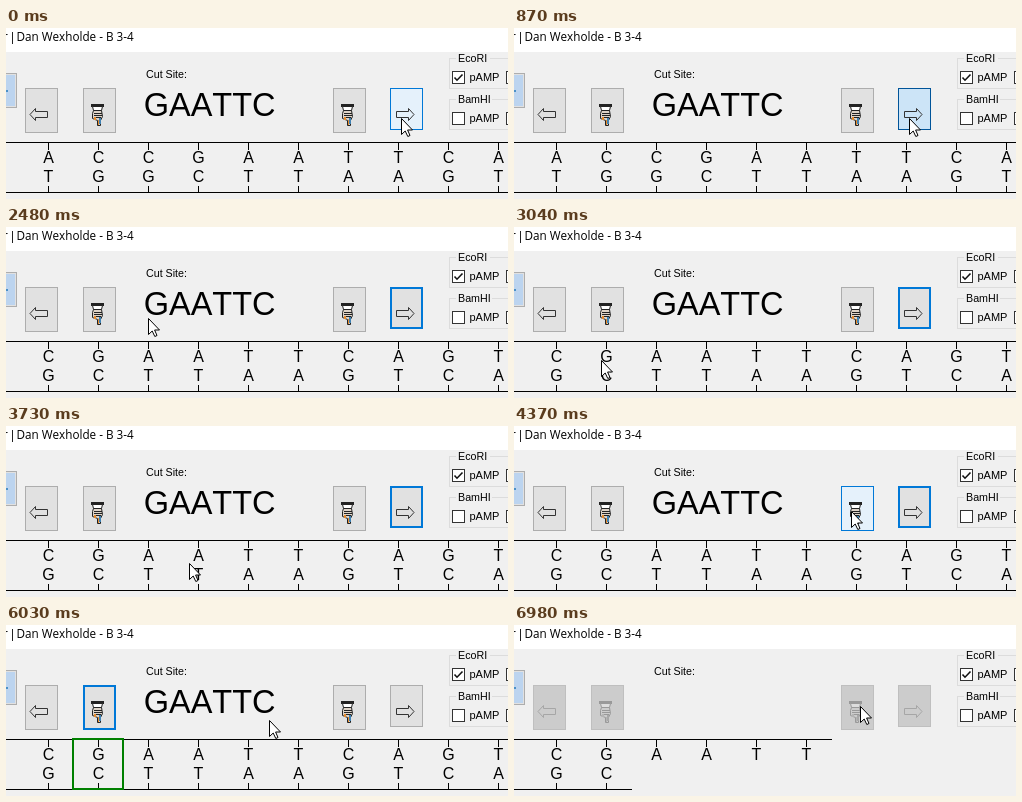
Recreate the animation shown at these times as an HTML page with a canvas. Size 502 by 171 pixels, loop 7710 ms.

```html
<!DOCTYPE html>
<html>
<head>
<meta charset="utf-8">
<style>
  html, body { margin: 0; width: 100%; height: 100%; overflow: hidden; background: #f0f0f0; }
  canvas { display: block; }
</style>
</head>
<body>
<canvas id="stage" width="502" height="171"></canvas>
<script>
const ctx = document.getElementById('stage').getContext('2d');
const LOOP = 7710;
const SANS = '"Liberation Sans", Arial, sans-serif';
const UI = '"Open Sans", "Noto Sans", sans-serif';
const STRAND = 'ACCGAATTCAGT';
const PAIR = { A: 'T', T: 'A', C: 'G', G: 'C' };
const CUT_TIME = 6770;

const BUTTONS = [
  { id: 'left', x: 19, h: 45 },
  { id: 'topCut', x: 77, h: 45 },
  { id: 'bottomCut', x: 327, h: 45 },
  { id: 'right', x: 384, h: 42 },
];
const BUTTON_Y = 60, BUTTON_W = 33;

const PRESSES = [
  ['right', 870, 1050], ['right', 1690, 1840],
  ['topCut', 5160, 5290], ['bottomCut', 6640, 6980],
];

const STYLES = {
  normal: ['#e1e1e1', '#adadad', 1],
  hover: ['#e5f1fb', '#0078d7', 1],
  focus: ['#e1e1e1', '#0078d7', 2],
  pressed: ['#cce4f7', '#005499', 1],
  disabled: ['#cccccc', '#bfbfbf', 1],
};

// Pointer moves: start, end, steps, then [progress, x, y] knots.
const MOVES = [
  [2200, 2660, 11, [[0, 395, 90], [0.2, 345, 91], [0.636, 142, 91], [1, 98, 87]]],
  [2890, 3090, 5, [[0, 98, 87], [1, 84, 144]]],
  [3270, 4040, 17, [[0, 84, 144], [0.588, 183, 137], [1, 340, 135]]],
  [4090, 4830, 16, [[0, 340, 135], [0.35, 347, 85], [0.85, 140, 94], [1, 109, 95]]],
  [4880, 4980, 2, [[0, 109, 95], [1, 95, 88]]],
  [5670, 6310, 15, [[0, 95, 88], [0.2, 135, 93], [0.6, 263, 95], [1, 346, 81]]],
];

function pointerAt(t) {
  let pos = [395, 90];
  for (const [start, end, steps, knots] of MOVES) {
    if (t < start) break;
    const step = Math.floor((t - start) / (end - start) * (steps - 1) + 0.2);
    const p = Math.min(1, (step + 1) / steps);
    const i = Math.max(1, knots.findIndex(k => k[0] >= p));
    const [a, b] = [knots[i - 1], knots[i]];
    const f = (p - a[0]) / (b[0] - a[0]);
    pos = [1, 2].map(n => Math.round(a[n] + (b[n] - a[n]) * f));
  }
  return pos;
}

function rect(x, y, w, h, fill) {
  ctx.fillStyle = fill;
  ctx.fillRect(x, y, w, h);
}

function box(x, y, w, h, fill, border, line = 1) {
  rect(x, y, w, h, border);
  rect(x + line, y + line, w - 2 * line, h - 2 * line, fill);
}

function text(str, x, y, size, font = SANS, align = 'left') {
  ctx.font = `${size}px ${font}`;
  ctx.textAlign = align;
  ctx.fillStyle = '#000';
  ctx.fillText(str, x, y);
}

function shape(d, x, y, fill, stroke, { mirror = 1, line = 1 } = {}) {
  const path = new Path2D(d);
  ctx.save();
  ctx.translate(x, y);
  ctx.scale(mirror, 1);
  ctx.lineWidth = line;
  if (fill) { ctx.fillStyle = fill; ctx.fill(path); }
  if (stroke) { ctx.strokeStyle = stroke; ctx.stroke(path); }
  ctx.restore();
}

function arrow(x, mirror, disabled) {
  shape('M9 .5L3.5-5.5V-2.5H-8.5V3.5H3.5V6.5Z', x, 86, null, disabled ? '#a6a6a6' : '#333', { mirror });
}

function hand(x, disabled) {
  const [ink, skin, warm, cool] = disabled
    ? ['#999', '#ccc', '#b4b4b4', '#a8a8a8']
    : ['#222', '#ddd3c8', '#e58a2c', '#3f83b5'];
  rect(x - 6, 76, 13, 3, ink);
  shape('M-4.5-8.5H5.5L4.5-4.5H-3.5Z', x, 87, disabled ? '#ddd' : '#fff', ink);
  shape('M-3.5-4.5H4.5L5.5 1.5 3.5 5.5V10.5H.5V5.5L-4.5 3.5V-1.5Z', x, 87, skin, ink);
  shape('M-3-1.5H5M-3 .5H5M-2 2.5H4', x, 87, null, ink);
  rect(x - 3, 89, 2, 3, warm);
  rect(x + 1, 92, 1, 5, warm);
  rect(x + 2, 90, 2, 6, cool);
}

function button({ id, x, h }, t, [px, py]) {
  const focused = t < 5160 ? 'right' : t < 6640 ? 'topCut' : 'bottomCut';
  const pressed = PRESSES.some(([who, from, to]) => who === id && t >= from && t < to);
  const hovered = px >= x && px < x + BUTTON_W && py >= BUTTON_Y && py < BUTTON_Y + h;
  const state = pressed ? 'pressed' : t >= CUT_TIME ? 'disabled'
    : hovered ? 'hover' : focused === id ? 'focus' : 'normal';
  box(x, BUTTON_Y, BUTTON_W, h, ...STYLES[state]);
  const off = state === 'disabled';
  if (id === 'left') arrow(x + 14, -1, off);
  else if (id === 'right') arrow(x + 15, 1, off);
  else hand(x + 14, off);
}

function group(title, y, width, checked) {
  box(443, y, 80, 31, '#f0f0f0', '#dcdcdc');
  rect(450, y, width, 1, '#f0f0f0');
  text(title, 452, y + 4, 10.7);
  for (const x of [446, 500]) box(x, y + 13, 13, 13, '#fff', '#333');
  if (checked) shape('M2.5 6.5L5 9.2 10.5 3.5', 446, y + 13, null, '#111', { line: 1.6 });
  text('pAMP', 463.5, y + 23, 11);
}

function strands(t) {
  const cut = t >= CUT_TIME;
  const shift = t < 1050 ? 0 : t < 1840 ? 1 : 2;
  const row = (count, lineY, tickY, baseline, pick) => {
    rect(0, lineY, count < 10 ? 18 + 50 * count : 502, 1, '#000');
    for (let i = 0; i < count; i++) {
      rect(42 + 50 * i, tickY, 1, 7, '#000');
      text(pick(STRAND[i + shift]), 42.5 + 50 * i, baseline, 16, SANS, 'center');
    }
  };
  row(cut ? 6 : 10, 114, 115, 135, base => base);
  row(cut ? 2 : 10, 164, 158, 154, base => PAIR[base]);
  if (t >= 5290 && !cut) {
    ctx.strokeStyle = '#008000';
    ctx.lineWidth = 2;
    ctx.strokeRect(67, 114, 50, 50);
  }
}

function draw(t) {
  const pointer = pointerAt(t);
  ctx.fontKerning = 'none';
  rect(0, 0, 502, 171, '#f0f0f0');
  rect(0, 0, 502, 24, '#fff');
  text('r', -3, 13, 11.7, UI);
  rect(6, 4, 1, 12, '#222');
  text('Dan Wexholde - B 3-4', 10.5, 13, 11.7, UI);

  box(-20, 45, 31, 35, '#e1e1e1', '#adadad');
  rect(0, 47, 9, 31, '#bcd4ef');
  rect(0, 62, 2, 2, '#4a90c8');
  text('Cut Site:', 140, 50, 10.7);
  if (t < CUT_TIME) text('GAATTC', 137.7, 88, 32.5);

  group('EcoRI', 30, 34, true);
  group('BamHI', 71, 36, false);
  strands(t);
  BUTTONS.forEach(b => button(b, t, pointer));
  shape('M.5.5V16.5L4.2 13 6.8 18.5 9 17.5 6.6 12H11.5Z', ...pointer, '#fff', '#000');
}

function frame(now) {
  draw(now % LOOP);
  requestAnimationFrame(frame);
}
requestAnimationFrame(frame);
</script>
</body>
</html>
```
